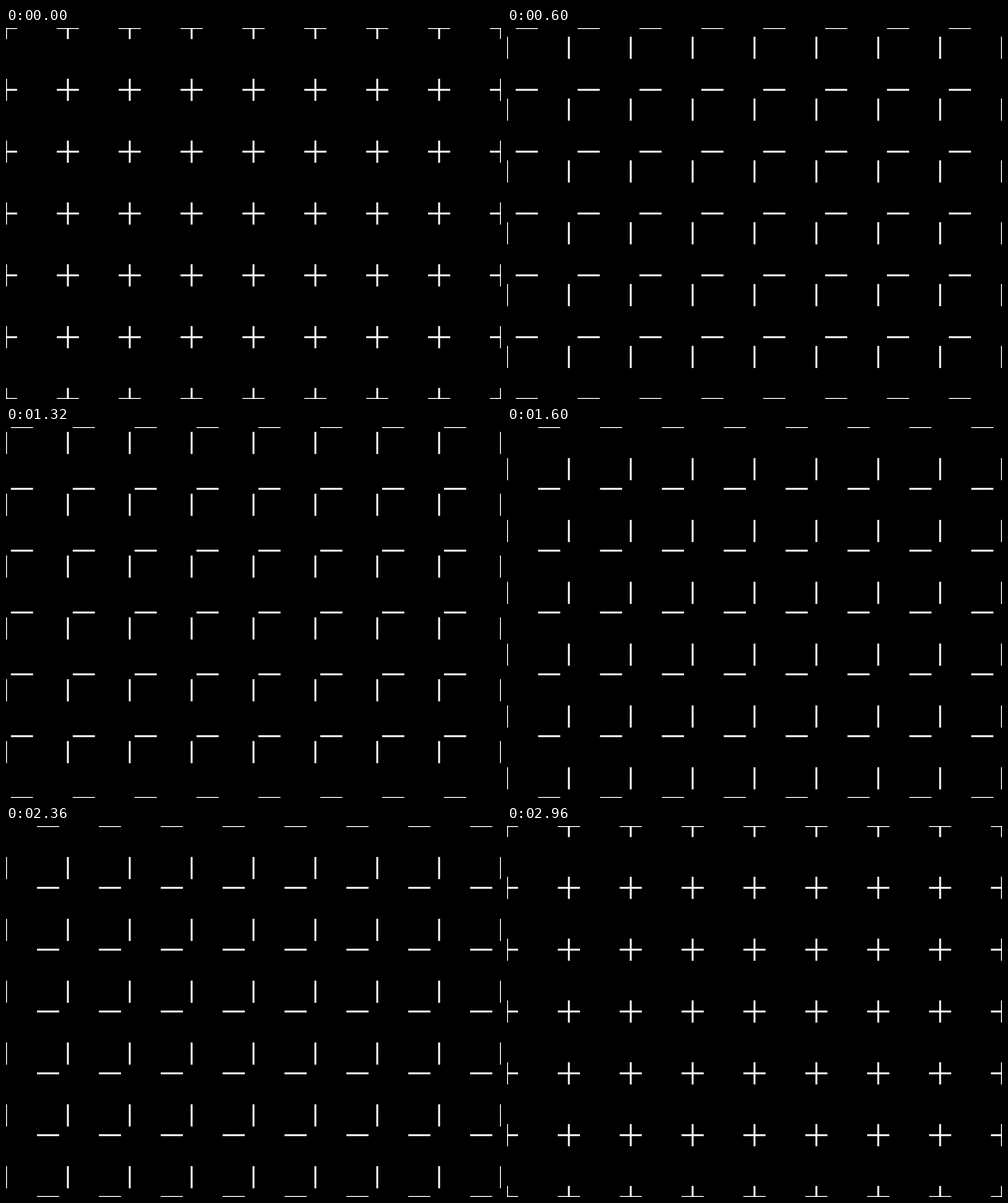
Animation, 800 px wide and 600 px high, one loop 3 s. Source, as an HTML page with a canvas:

```html
<!DOCTYPE html>
<html lang="en">
<head>
<meta charset="utf-8">
<title>Sliding dashes</title>
<style>
  html, body { margin: 0; width: 100%; height: 100%; overflow: hidden; background: #000; }
  canvas { display: block; }
</style>
</head>
<body>
<canvas id="stage" width="800" height="600"></canvas>
<script>
const ctx = document.getElementById('stage').getContext('2d');
const W = 800, H = 600;
const LOOP = 3000, STEP = 40, TRAVEL = LOOP - STEP;
const CELL = 100, DASH = 35.8, THICK = 3;

const smooth = u => u * u * (3 - 2 * u);

function draw(ms) {
  const t = Math.floor((ms % LOOP) / STEP) * STEP;
  const shift = (3 * CELL * smooth(t / TRAVEL)) % CELL;

  ctx.fillStyle = '#000';
  ctx.fillRect(0, 0, W, H);
  ctx.fillStyle = '#fff';

  // Horizontal dashes slide right, vertical ones slide down.
  for (let y = -CELL; y <= H; y += CELL) {
    for (let x = -CELL; x <= W; x += CELL) {
      ctx.fillRect(x + shift - DASH / 2, y - THICK / 2, DASH, THICK);
      ctx.fillRect(x - THICK / 2, y + shift - DASH / 2, THICK, DASH);
    }
  }
}

let start = null;
function tick(now) {
  if (start === null) start = now;
  draw(now - start);
  requestAnimationFrame(tick);
}

draw(0);
requestAnimationFrame(tick);
</script>
</body>
</html>
```
